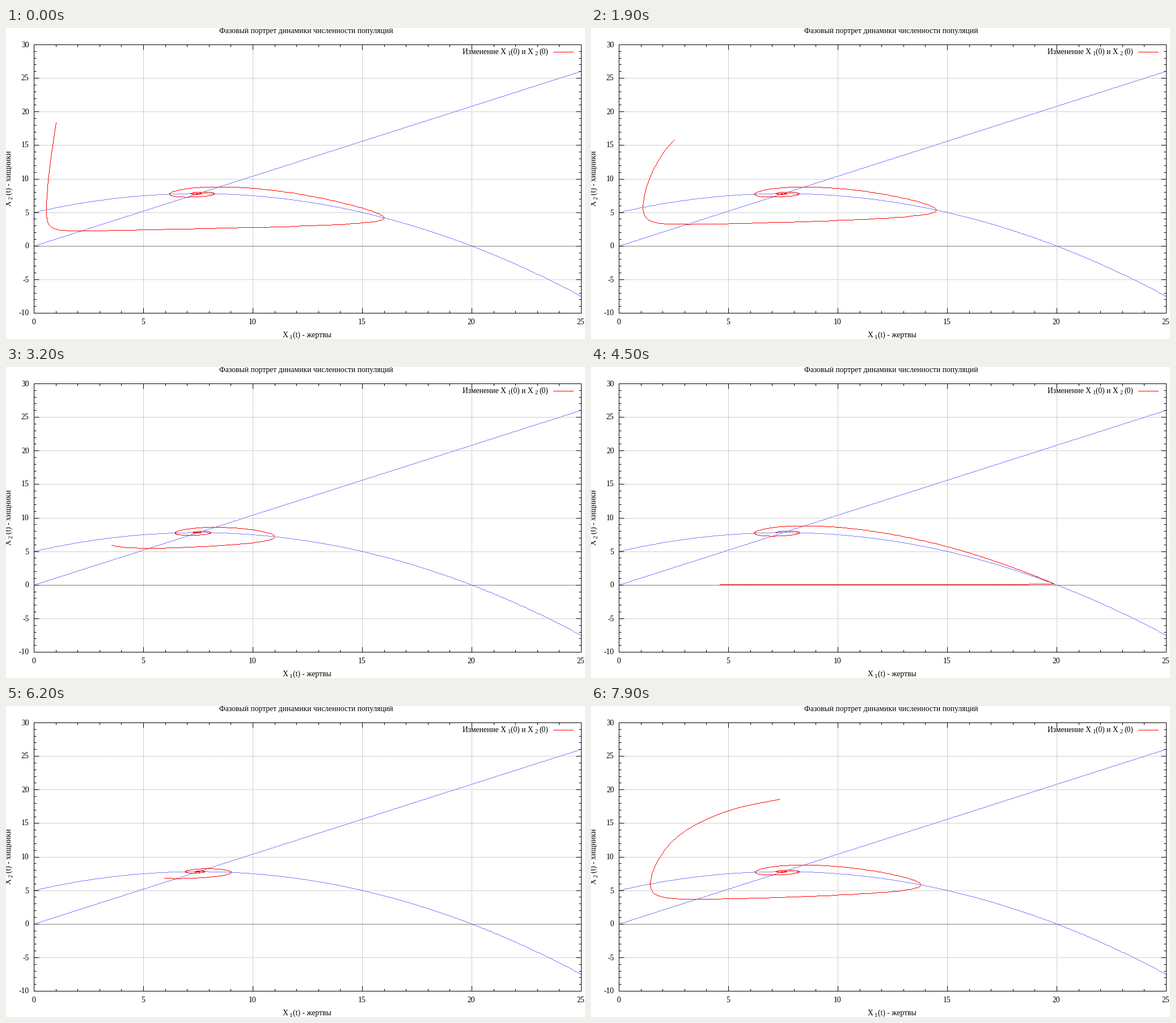
A matplotlib script that plays this animation: 1021 px wide and 548 px high, repeating every 8000 ms.

```python
import numpy as np
import matplotlib.pyplot as plt
from matplotlib.animation import FuncAnimation

W, H, DPI = 1021, 548, 64
PX = 72 / DPI                      # one pixel in points
FRAMES, INTERVAL = 80, 100
LEFT, RIGHT, TOP, BOTTOM = 49, 1014, 29, 502
FONT = 13.65

# Holling-Tanner predator-prey model
R, S, CAP, HALF, J = 0.78, 0.1, 20, 5, 0.96
STEP, STEPS = 0.2, 500

plt.rcParams["font.family"] = "Liberation Serif"
plt.rcParams["path.simplify"] = False


def px(x):
    """Pixel column of a data value."""
    return np.floor(LEFT + x * (RIGHT - LEFT) / 25 + 0.5)


def py(y):
    """Pixel row of a data value."""
    return np.floor(BOTTOM - (y + 10) * (BOTTOM - TOP) / 40 + 0.5)


def rate(state):
    x, y = state
    dx = R * x * (1 - x / CAP - y / (HALF + x))
    dy = S * y * (1 - J * y / x)
    return np.array([dx, dy])


def solve(state):
    path = [state]
    for _ in range(STEPS):
        k1 = rate(state)
        k2 = rate(state + STEP / 2 * k1)
        k3 = rate(state + STEP / 2 * k2)
        k4 = rate(state + STEP * k3)
        state = state + STEP / 6 * (k1 + 2 * k2 + 2 * k3 + k4)
        path.append(state)
    return np.array(path)


fig = plt.figure(figsize=(W / DPI, H / DPI), dpi=DPI, facecolor="white")
ax = fig.add_axes([0, 0, 1, 1])
ax.set_xlim(0, W)
ax.set_ylim(H, 0)
ax.axis("off")


def line(xs, ys, color="black", **kw):
    return ax.plot(xs, ys, color=color, lw=PX, snap=False,
                   solid_capstyle="butt", solid_joinstyle="miter", **kw)[0]


def cells(cols, rows):
    """Dashes one pixel long that fill the given pixels."""
    cols, rows = np.broadcast_arrays(cols, rows)
    gap = np.full(cols.shape, np.nan)
    xs = np.stack([cols, cols + 1, gap], 1).ravel()
    return xs, np.repeat(rows + 0.5, 3)


def dots(cols, rows, color, z=1):
    line(*cells(cols, rows), color, zorder=z)


def trace(cols, rows):
    """Pixels of a polyline, one per step along the longer axis."""
    step = np.maximum(abs(np.diff(cols)), abs(np.diff(rows)))
    at = np.concatenate([[0], np.cumsum(step)])
    t = np.arange(at[-1] + 1)
    pts = np.stack([np.interp(t, at, cols), np.interp(t, at, rows)])
    return np.unique(np.floor(pts + 0.5), axis=1)


def text(x, y, s, ha="left", size=FONT, **kw):
    ax.text(x, y, s, ha=ha, va="baseline", fontsize=size * PX,
            color="black", **kw)


# grid, ticks and tick labels
cols = np.arange(LEFT, RIGHT, 2)
rows = np.arange(TOP, BOTTOM, 2)
for v in range(5, 25, 5):
    dots(px(v), rows, "#a0a0a0")
for v in range(-5, 30, 5):
    dots(cols, py(v), "black" if v == 0 else "#a0a0a0")

x0, x1, y0, y1 = LEFT + 0.5, RIGHT + 0.5, TOP + 0.5, BOTTOM + 0.5
line([x0, x1, x1, x0, x0], [y0, y0, y1, y1, y0], zorder=4)

for v in range(26):
    n = 9 if v % 5 == 0 else 4
    x = px(v) + 0.5
    line([x, x], [y1, y1 - n])
    line([x, x], [y0, y0 + n])
    if v % 5 == 0:
        text(x - 1, 521.5, str(v), "center")
for v in range(-10, 31):
    n = 9 if v % 5 == 0 else 4
    y = py(v) + 0.5
    line([x0, x0 + n], [y, y])
    line([x1, x1 - n], [y, y])
    if v % 5 == 0:
        text(40.5, y + 4, str(v), "right")

# titles and legend
SUB = FONT * 0.8
text(529.5, 9, "Фазовый портрет динамики численности популяций", "center")

text(488, 545, "X")
text(499.5, 547.5, "1", size=SUB)
text(505.5, 545, "(t) - жертвы")

up = dict(rotation=90, rotation_mode="anchor")
text(9, 314, "X", **up)
text(11.5, 302.5, "2", size=SUB, **up)
text(9, 294, "(t) - хищники", **up)

text(805, 46, "Изменение X")
text(884, 48.5, "1", size=SUB)
text(889.5, 46, "(0) и X")
text(932.5, 48.5, "2", size=SUB)
text(956.5, 46, "(0)", "right")
line([965, 1001], [42.5, 42.5], "red")

# nullclines
xs = (cols - LEFT) * 25 / (RIGHT - LEFT)
dots(cols, py(xs / J), "blue", 2)
dots(cols, py((1 - xs / CAP) * (HALF + xs)), "blue", 2)

# the starting point slides along a sine wave
start = 1 + 0.08 * np.arange(FRAMES)
paths = solve(np.array([start, 10 + 10 * np.sin(start)]))
orbit = line([], [], "red", zorder=3)


def draw(i):
    x, y = paths[:, :, i].T
    orbit.set_data(*cells(*trace(px(x), py(y))))
    return [orbit]


anim = FuncAnimation(fig, draw, frames=FRAMES, interval=INTERVAL,
                     repeat=True, repeat_delay=0, blit=False)
plt.show()
```
